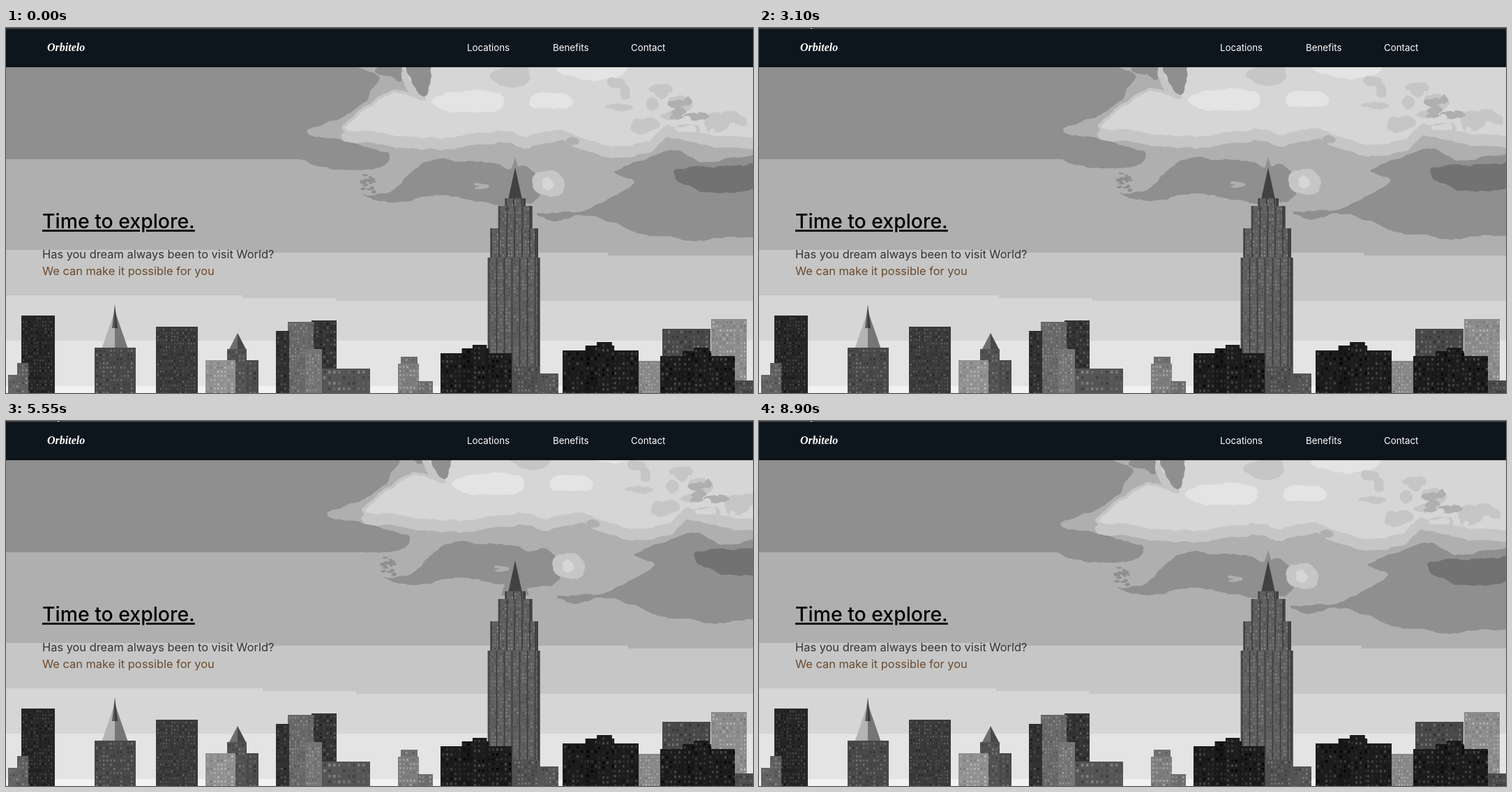
Animation of 1071x523 px, one loop 9000 ms. Source, as an HTML page with a canvas:

```html
<!DOCTYPE html>
<html lang="en">
<head>
<meta charset="utf-8">
<title>Travel page</title>
<style>
html, body { margin: 0; width: 100%; height: 100%; overflow: hidden; background: #afafaf; }
canvas, svg { position: absolute; left: 0; top: 0; width: 1071px; height: 523px; }
text { font-family: Inter, sans-serif; }
.nav { font-size: 13.3px; fill: #fff; }
.copy { font-size: 16.4px; }
.logo { font: italic bold 16px "Liberation Serif", serif; fill: #fff; }
.title { font-size: 28.4px; font-weight: 500; text-decoration: underline; }
</style>
</head>
<body>
<canvas id="sky" width="1071" height="523"></canvas>
<canvas id="city" width="1071" height="523"></canvas>
<svg viewBox="0 0 1071 523">
  <rect y="56" width="1071" height="1" opacity=".15"/>
  <rect width="1071" height="54" fill="#0d161d"/>
  <rect width="1071" height="1.4" fill="#484446"/>
  <rect y="54" width="1071" height="2" fill="#0a1014"/>
  <rect id="cursor" x="74" width="2" height="1" fill="#fff"/>
  <text class="logo" x="59" y="33">Orbitelo</text>
  <text class="nav" x="661" y="33">Locations</text>
  <text class="nav" x="784" y="33">Benefits</text>
  <text class="nav" x="896" y="33">Contact</text>
  <text class="title" x="52" y="287">Time to explore.</text>
  <text class="copy" x="52" y="329.5" fill="#333">Has you dream always been to visit World?</text>
  <text class="copy" x="52" y="353.5" fill="#6b4a2e">We can make it possible for you</text>
</svg>
<script>
const sky = document.getElementById('sky').getContext('2d');
const city = document.getElementById('city').getContext('2d');
const cursor = document.getElementById('cursor');
const W = 1071, H = 523, LOOP = 9000;
const DARKEST = '#727272', DARK = '#8f8f8f', MID = '#afafaf', SOFT = '#c6c6c6', LIGHT = '#d6d6d6', WHITE = '#e4e4e4';

let seed = 7;
const rand = () => (seed = seed * 16807 % 2147483647) / 2147483647;
const between = (a, b) => a + rand() * (b - a);

// Smooth closed curve through a few key points, with ragged edges.
function rough(points, depth = 4) {
  for (; depth; depth--) {
    const n = points.length, at = i => points[(i + n) % n];
    points = points.flatMap((p, i) => {
      const q = at(i + 1), a = at(i - 1), b = at(i + 2);
      const shake = Math.min(Math.hypot(q[0] - p[0], q[1] - p[1]) * .2, 5);
      const mid = k => (9 * (p[k] + q[k]) - a[k] - b[k]) / 16 + between(-shake, shake) / 2;
      return [p, [mid(0), mid(1)]];
    });
  }
  const path = new Path2D();
  points.forEach(p => path.lineTo(...p));
  path.closePath();
  return path;
}

const clouds = [];
const add = (color, path, rim = 1) => clouds.push({ color, path, rim });

function blob(color, x, y, rx, ry) {
  const points = Array.from({ length: 8 }, (_, i) => {
    const a = i * Math.PI / 4, r = between(.75, 1.2);
    return [x + Math.cos(a) * rx * r, y + Math.sin(a) * ry * r];
  });
  add(color, rough(points, 3));
}

function scatter(count, color, x1, y1, x2, y2, size) {
  while (count--) blob(color, between(x1, x2), between(y1, y2), between(.5, 1.5) * size, between(.3, .8) * size);
}

function buildClouds() {
  add(MID, rough([[528, 30], [531, 70], [508, 110], [470, 134], [430, 147], [440, 157], [500, 171], [546, 188], [534, 235], [1160, 235], [1160, 30]]));
  add(DARK, rough([[418, 188], [425, 165], [460, 160], [507, 171], [546, 188], [515, 204], [450, 200]]));
  add(DARK, rough([[510, 240], [545, 238], [592, 197], [668, 193], [715, 204], [748, 204], [758, 246], [695, 254], [630, 241], [548, 251]]));
  add(DARK, rough([[760, 267], [830, 262], [898, 224], [870, 207], [955, 178], [1010, 194], [1160, 172], [1160, 285], [1040, 300], [975, 306], [890, 290], [838, 270], [790, 277]]));
  add(DARKEST, rough([[958, 204], [1040, 199], [1140, 186], [1140, 220], [1015, 237], [972, 226]], 5));
  blob(SOFT, 773, 226, 21, 19);
  blob(LIGHT, 773, 224, 8, 8);
  scatter(3, MID, 664, 222, 684, 234, 5);
  scatter(18, DARK, 505, 212, 527, 238, 3);
  scatter(6, DARK, 540, 60, 575, 74, 10);

  const crest = rough([[607, 30], [600, 104], [555, 94], [510, 120], [483, 145], [530, 151], [605, 157], [700, 148], [745, 157], [790, 147], [860, 170], [920, 163], [945, 140], [1000, 152], [1140, 150], [1140, 30]]);
  const lowerRim = new Path2D();
  lowerRim.addPath(crest, new DOMMatrix([1, 0, 0, 1, 0, 12]));
  add(SOFT, lowerRim, 10);
  add(SOFT, crest, 9);
  add(LIGHT, crest);
  add(DARK, rough([[573, 30], [577, 72], [598, 99], [605, 62], [606, 30]]));

  blob(WHITE, 660, 108, 58, 17);
  blob(WHITE, 777, 107, 28, 12);
  blob(WHITE, 840, 60, 50, 17);
  blob(SOFT, 722, 70, 28, 17);
  scatter(14, SOFT, 870, 75, 1050, 150, 15);
  scatter(10, MID, 955, 106, 1000, 136, 9);
  scatter(5, LIGHT, 960, 106, 1040, 150, 7);
  scatter(3, MID, 790, 162, 815, 170, 9);
}

function drawSky(ms) {
  const dx = 14 - 18.5 * Math.cos((ms - 1350) / LOOP * 2 * Math.PI);
  const rect = (color, x, y) => { sky.fillStyle = color; sky.fillRect(x, y, W, H); };
  // Each lower band starts a little deeper to the right, in two steps.
  const band = (color, above, y, x1, x2) => {
    rect(color, 0, y);
    sky.fillStyle = above;
    sky.fillRect(x1 + dx, y, W, 4);
    sky.fillRect(x2 + dx, y, W, 8);
  };
  rect(DARK, 0, 0);
  rect(MID, 0, 188);
  band(SOFT, MID, 318, 340, 860);
  band(LIGHT, SOFT, 383, 336, 470);
  rect(WHITE, 0, 448);
  rect('#f2f2f2', 0, 513);
  sky.save();
  sky.translate(dx, -.52 * dx);
  for (const { color, path, rim } of clouds) {
    sky.fillStyle = sky.strokeStyle = color;
    sky.lineWidth = rim;
    sky.fill(path);
    sky.stroke(path);
  }
  sky.restore();
}

const grey = v => `rgb(${v},${v},${v})`;

// Building down to the ground, its face mottled with seeded windows.
function slab(x, top, w, tone, gap = 5) {
  city.fillStyle = grey(tone);
  city.fillRect(x, top, w, H - top);
  for (let v = top + 3; v < H; v += gap + 1)
    for (let u = x + 2; u < x + w - 2; u += gap) {
      city.fillStyle = grey(tone + between(-25, 45));
      city.fillRect(u, v, gap * .5, gap * .6);
    }
}

function triangle(tone, x, top, base, left, right) {
  city.fillStyle = grey(tone);
  city.beginPath();
  city.moveTo(x, top);
  city.lineTo(x - left, base);
  city.lineTo(x + right, base);
  city.fill();
}

function spire(x, top, base, half, tone) {
  triangle(tone, x, top, base, half, 0);
  triangle(tone * .65, x, top, base, 0, half);
}

function apartments(x, top, w) {
  slab(x, top + 12, w, 28, 6);
  slab(x + w * .3, top + 5, w * .38, 24, 6);
  slab(x + w * .45, top, w * .2, 28, 6);
}

// Stepped skyscraper: each tier is wider than the one above.
function skyscraper(x) {
  triangle(143, x, 185, 250, 20, 20);
  triangle(65, x, 200, 250, 11, 11);
  const widths = [30, 49, 68, 75], tops = [244, 255, 287, 329];
  widths.forEach((w, i) => {
    const left = x - w / 2 - 2 * (i > 1);
    slab(left, tops[i], w, 95, 4);
    city.fillStyle = grey(65);
    for (let u = left + 1; u < left + w; u += 11) city.fillRect(u, tops[i], 2, H);
    city.fillRect(left + w - 4, tops[i], 4, H);
  });
}

function buildCity() {
  slab(22, 412, 48, 38, 4);
  slab(16, 480, 16, 95);
  slab(3, 497, 15, 100);
  spire(156, 405, 460, 19, 180);
  spire(156, 396, 430, 4, 90);
  slab(127, 458, 59, 72);
  slab(215, 428, 60, 58, 4);
  slab(335, 476, 27, 75, 6);
  spire(332, 437, 462, 13, 110);
  slab(317, 460, 28, 82);
  slab(286, 476, 43, 145);
  slab(438, 419, 36, 52);
  slab(404, 421, 37, 105, 4);
  slab(387, 434, 19, 48);
  slab(429, 460, 24, 118, 4);
  slab(453, 488, 69, 85, 7);
  slab(566, 471, 24, 110);
  slab(562, 481, 30, 125);
  slab(590, 506, 22, 110);
  skyscraper(730);
  slab(727, 485, 38, 80);
  slab(762, 495, 30, 85);
  apartments(623, 454, 102);
  apartments(798, 450, 109);
  slab(907, 477, 31, 135, 4);
  slab(1011, 417, 51, 140);
  slab(941, 431, 69, 72, 6);
  apartments(938, 458, 107);
  slab(1045, 505, 26, 75);
}

buildClouds();
buildCity();

const start = performance.now();
function frame() {
  const ms = (performance.now() - start) % LOOP;
  drawSky(ms);
  cursor.style.visibility = ms < 50 ? 'hidden' : 'visible';
  requestAnimationFrame(frame);
}
frame();
</script>
</body>
</html>
```
